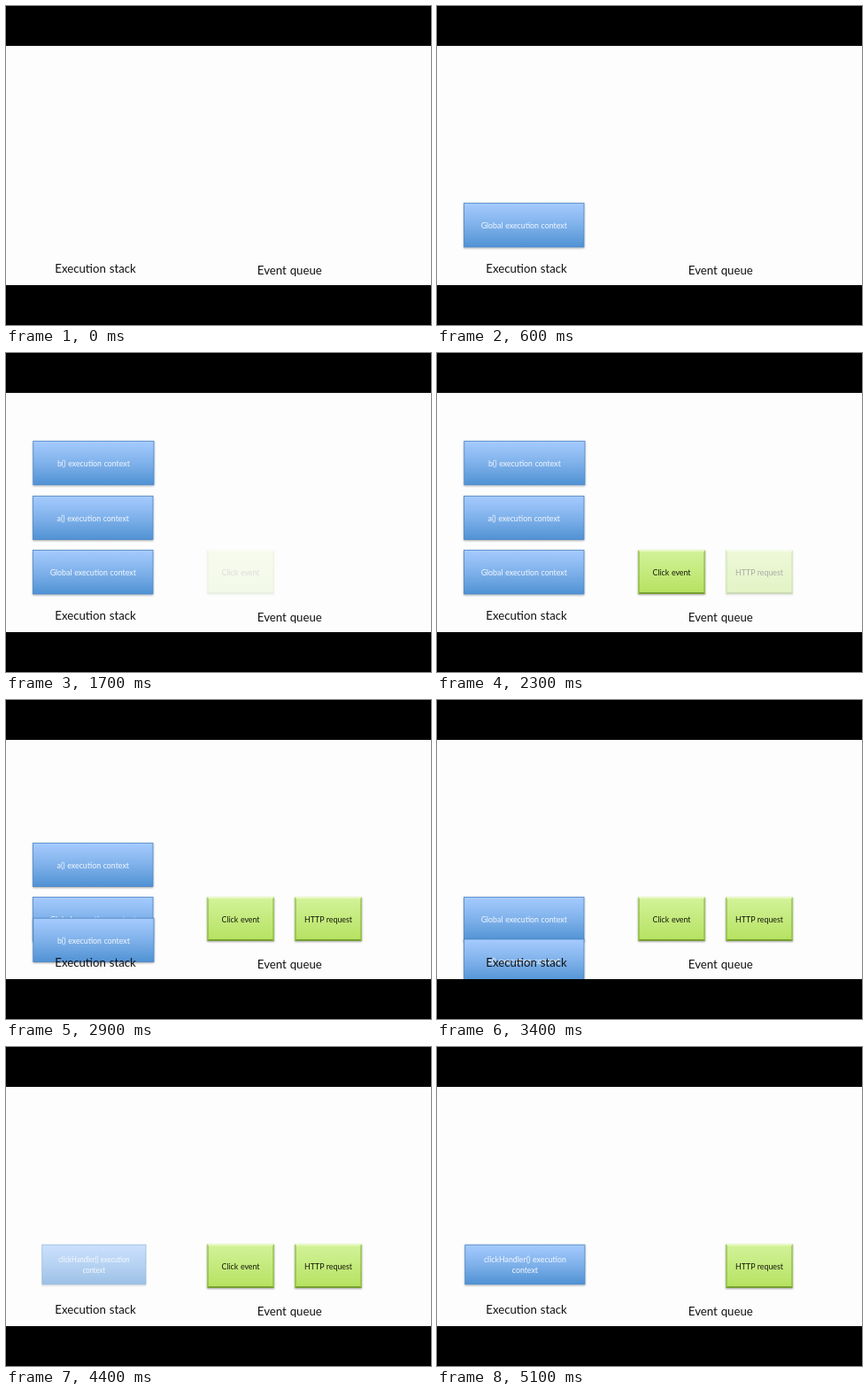
Animation of 480x360 px, one loop 5200 ms. Source, as an HTML page:

```html
<!DOCTYPE html>
<html lang="en">
<head>
<meta charset="utf-8">
<title>Execution stack and event queue</title>
<style>
  html, body { margin: 0; width: 100%; height: 100%; overflow: hidden; background: #000; }
  svg { display: block; width: 480px; height: 360px; }
  text { font-family: Lato, sans-serif; text-anchor: middle; }
  .label { font-size: 13.2px; word-spacing: .6px; fill: #111; }
  .box text { font-size: 8.8px; word-spacing: .4px; }
  .call text { fill: #f3f8ff; }
  .event text { fill: #14190a; }
  .call .face { fill: url(#blue); stroke: #4c86c6; stroke-width: .8; }
  .event .face { fill: url(#green); }
</style>
</head>
<body>
<svg viewBox="0 0 480 360">
  <defs>
    <linearGradient id="blue" x2="0" y2="1">
      <stop offset="0" stop-color="#a6cbff"/>
      <stop offset=".5" stop-color="#7fb1ea"/>
      <stop offset="1" stop-color="#5092d4"/>
    </linearGradient>
    <linearGradient id="green" x2="0" y2="1">
      <stop offset="0" stop-color="#d3f29a"/>
      <stop offset="1" stop-color="#b5e260"/>
    </linearGradient>
    <filter id="shadow" x="-10%" y="-10%" width="120%" height="130%">
      <feDropShadow dx="0" dy="1" stdDeviation=".9" flood-color="#000" flood-opacity=".35"/>
    </filter>
    <clipPath id="slide"><rect y="45" width="480" height="270"/></clipPath>
  </defs>
  <g clip-path="url(#slide)">
    <rect y="45" width="480" height="270" fill="#fdfdfd"/>
    <g id="boxes"></g>
    <text class="label" x="101" y="300.7">Execution stack</text>
    <text class="label" x="320.3" y="302.9">Event queue</text>
  </g>
</svg>
<script>
const LOOP = 5200, TICK = 100, SPAN = 450, FLOOR = 316;
const NS = 'http://www.w3.org/2000/svg';
const layer = document.getElementById('boxes');

const add = (parent, tag, attrs, text = '') => {
  const el = document.createElementNS(NS, tag);
  for (const key in attrs) el.setAttribute(key, attrs[key]);
  el.textContent = text;
  return parent.appendChild(el);
};

// Bevelled edges of the green boxes
const bevel = (g, x, y, w, h) => {
  const r = x + w, b = y + h, d = 2;
  const edge = (points, fill, opacity) =>
    add(g, 'polygon', { points, fill, 'fill-opacity': opacity });
  edge(`${x},${y} ${r},${y} ${r - d},${y + d} ${x + d},${y + d}`, '#f2ffd6', .65);
  edge(`${x},${y} ${x + d},${y + d} ${x + d},${b - d} ${x},${b}`, '#7fa83a', .5);
  edge(`${r},${y} ${r - d},${y + d} ${r - d},${b - d} ${r},${b}`, '#7fa83a', .5);
  edge(`${x},${b} ${r},${b} ${r - d},${b - d} ${x + d},${b - d}`, '#628a22', .75);
};

const box = (kind, x, y, w, h, lines, start, end, effect) => {
  const g = add(layer, 'g', { class: 'box ' + kind });
  add(g, 'rect', { class: 'face', x, y, width: w, height: h, filter: 'url(#shadow)' });
  if (kind === 'event') bevel(g, x, y, w, h);
  const mid = x + w / 2;
  const first = y + h / 2 + 4 - (lines.length - 1) * 6.5;
  lines.forEach((line, i) => add(g, 'text', { x: mid, y: first + i * 11.6 }, line));
  return { g, y, mid, start, end, effect };
};

const effects = {
  fly: (b, shown) => `translate(0 ${(FLOOR - b.y) * (1 - shown)})`,
  fade: () => '',
  expand: (b, shown) =>
    `translate(${b.mid} 0) scale(${.7 + .3 * shown} 1) translate(${-b.mid} 0)`
};

const boxes = [
  box('call', 30.5, 222.5, 135.5, 49.5, ['Global execution context'], 150, 3610, 'fly'),
  box('call', 30.5, 161.5, 135.5, 49, ['a() execution context'], 645, 3084, 'fly'),
  box('call', 30.8, 99.5, 136.2, 49.3, ['b() execution context'], 1142, 2595, 'fly'),
  box('event', 227, 222.3, 76, 49.7, ['Click event'], 1640, 4640, 'fade'),
  box('event', 326, 222.3, 76, 49.7, ['HTTP request'], 2140, Infinity, 'fade'),
  box('call', 31.8, 223.2, 135.2, 44.6, ['clickHandler() execution', 'context'], 4150, Infinity, 'expand')
];

const ramp = (t, from) => Math.min(1, Math.max(0, (t - from) / SPAN));

function draw() {
  // The picture moves in ticks of a tenth of a second
  const t = Math.floor(performance.now() / TICK + .02) * TICK % LOOP;
  for (const b of boxes) {
    const shown = ramp(t, b.start) - ramp(t, b.end);
    b.g.setAttribute('visibility', shown > 0 ? 'visible' : 'hidden');
    b.g.setAttribute('transform', effects[b.effect](b, shown));
    b.g.setAttribute('opacity', b.effect === 'fly' ? 1 : shown);
  }
  requestAnimationFrame(draw);
}
draw();
</script>
</body>
</html>
```
